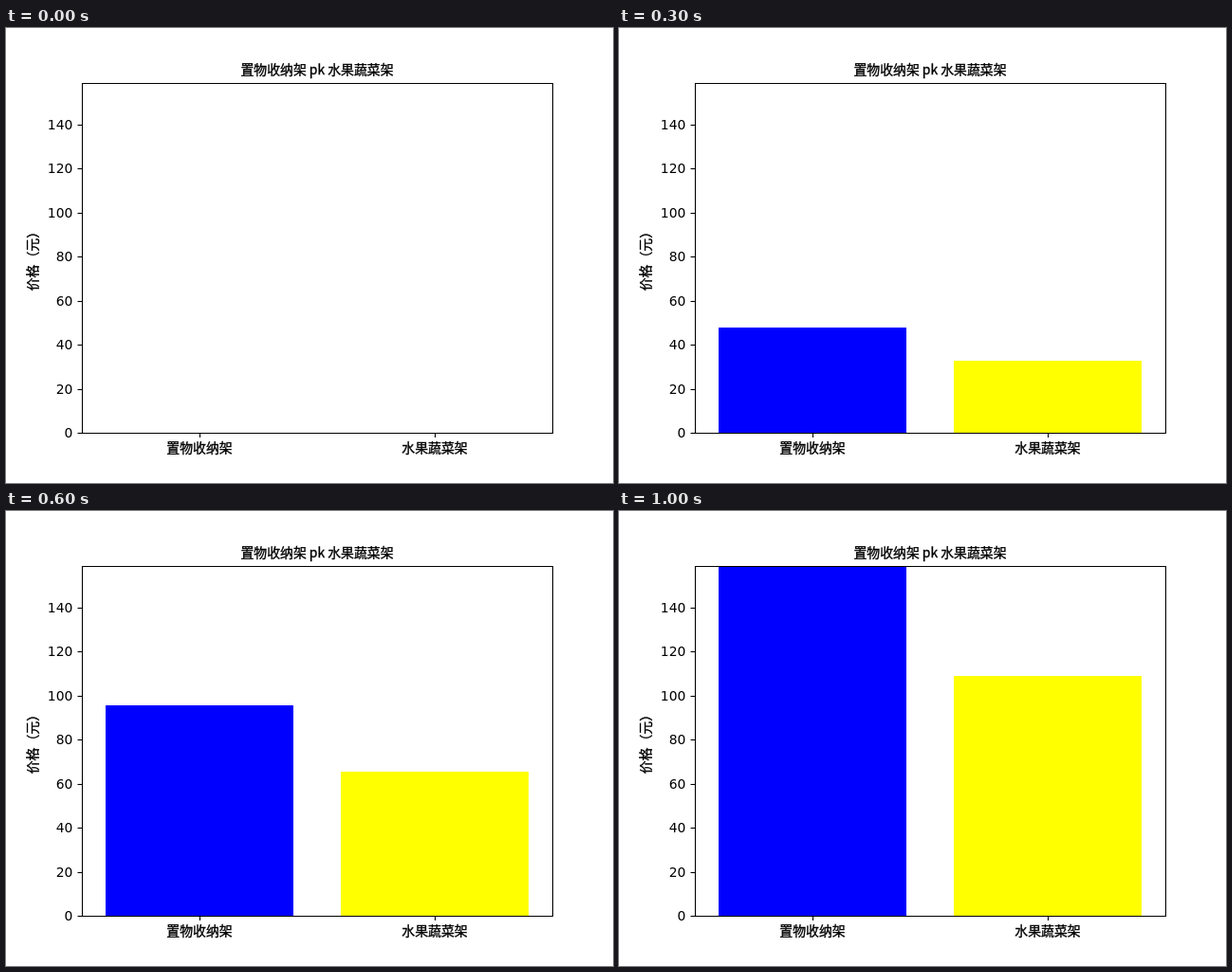
Write an HTML page that moves like this. It is 640x480 px and loops after 1.1 s.

```html
<!DOCTYPE html>
<html lang="zh-CN">
<head>
<meta charset="utf-8">
<style>
  html, body { margin: 0; width: 100%; height: 100%; overflow: hidden; background: #fff; }
  svg { display: block; }
  text { font-size: 13.89px; }
  .num { font-family: "DejaVu Sans", sans-serif; text-anchor: end; }
  .label { font-family: "Noto Sans CJK SC", "Noto Sans CJK", sans-serif; text-anchor: middle; stroke: #000; stroke-width: .35px; }
  .axis { fill: none; stroke: #000; stroke-width: 1.1; }
</style>
</head>
<body>
<svg id="chart" width="640" height="480" viewBox="0 0 640 480"></svg>
<script>
const chart = document.getElementById('chart');
const BASE = 427.2, HEIGHT = 369.6, MAX = 159;
const STEPS = 10, STEP_MS = 100;

const yOf = value => BASE - value / MAX * HEIGHT;

function add(tag, attrs, text = '') {
  const node = document.createElementNS('http://www.w3.org/2000/svg', tag);
  for (const key in attrs) node.setAttribute(key, attrs[key]);
  node.textContent = text;
  return chart.appendChild(node);
}

const label = (x, y, text, extra) => add('text', { class: 'label', x, y, ...extra }, text);
const line = d => add('path', { class: 'axis', d });

const bars = [
  { name: '置物收纳架', price: 159, x: 105, color: '#00f', center: 204 },
  { name: '水果蔬菜架', price: 109, x: 353, color: '#ff0', center: 452 }
];

for (const bar of bars) {
  bar.node = add('rect', { x: bar.x, width: 198, fill: bar.color });
  line(`M${bar.center + .5} 427v5`);
  label(bar.center, 448.4, bar.name);
}

for (let value = 0; value <= 140; value += 20) {
  const y = Math.round(yOf(value));
  line(`M75.5 ${y + .5}h5`);
  add('text', { class: 'num', x: 70.3, y: y + 5.3 }, value);
}

line('M80.5 58.5H576.5V427.5H80.5Z');
label(328, 49.4, bars.map(bar => bar.name).join(' pk '));
label(0, 0, '价格（元）', { transform: 'translate(32.5 242.6) rotate(-90)' });

function draw(now) {
  const step = Math.floor(now / STEP_MS) % (STEPS + 1);
  for (const { node, price } of bars) {
    const top = Math.round(yOf(price * step / STEPS));
    node.setAttribute('y', top);
    node.setAttribute('height', 427 - top);
  }
}

const start = performance.now();
function tick() {
  draw(performance.now() - start);
  requestAnimationFrame(tick);
}
tick();
</script>
</body>
</html>
```
